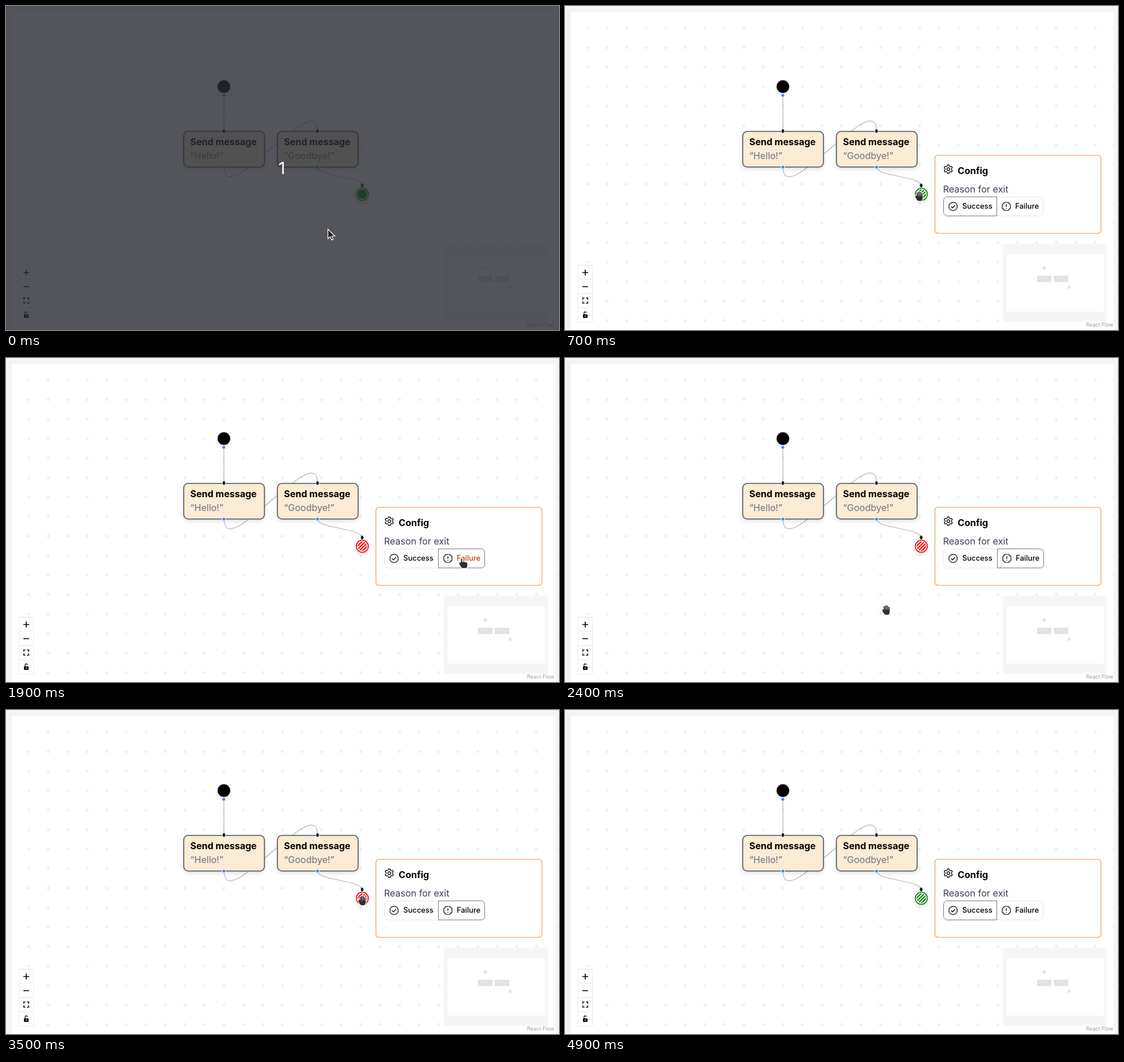
Write an HTML page that moves like this. It is 956x561 px and loops after 5.1 s.

```html
<!DOCTYPE html>
<html lang="en">
<head>
<meta charset="utf-8">
<title>Flow editor</title>
<style>
  html, body { margin: 0; width: 100%; height: 100%; overflow: hidden; background: #f3f4f6; }
  svg { display: block; width: 956px; height: 561px; font: 16px Inter, sans-serif; }
  .line { fill: none; stroke: #000; stroke-width: 1.2; stroke-linecap: round; stroke-linejoin: round; }
  .edge { fill: none; stroke: #b1b1b1; stroke-width: 1.2; }
  .title { font-weight: 700; }
  .quote { fill: #6b7280; }
  .option { font-size: 12.8px; font-weight: 500; }
  .shadow { filter: drop-shadow(0 3px 3px rgba(0, 0, 0, .14)); }
  .cursor { stroke-linecap: round; stroke-linejoin: round; }
  .cursor use:first-child { fill: #fff; stroke: #fff; stroke-width: 4.2; }
  .cursor use:last-child { fill: #2e2e2e; stroke: #2e2e2e; stroke-width: 2; }
</style>
</head>
<body>
<svg id="stage" viewBox="0 0 956 561">
  <defs>
    <pattern id="crosses" x="22.3" y="21.5" width="33.75" height="33.75" patternUnits="userSpaceOnUse">
      <path d="M13.5 16.9h6.75M16.9 13.5v6.75" stroke="#e4e4e4"/>
    </pattern>
    <pattern id="stripes" width="4" height="4" patternUnits="userSpaceOnUse" patternTransform="translate(616 326) rotate(45)">
      <path d="M2 0v4" stroke="currentColor" stroke-width="2.2"/>
    </pattern>
    <circle id="out" r="3" fill="#3b82f6" stroke="#fff"/>
    <ellipse id="in" rx="2.7" ry="3.7" fill="#0f172a" stroke="#fff" stroke-width=".8"/>
    <rect id="box" x=".8" y=".8" width="139.4" height="61.4" rx="7.5" fill="#fdecd4" stroke="#4b5563" stroke-width="1.6"/>
    <path id="grabShape" d="M-3.2-5.2-2.4 1M-.4-6.8V1M2.3-6.2V1M5-4.2 4.6 2M-5.6.5-3 4.5M-3.6 0H5.4V3Q5.2 6.6 3.8 7.4H-1.6Q-4 5-5.5 1Z"/>
    <path id="pointerShape" d="M0 1.2V9M3 6V9M5.7 6.8V10M8.3 7.8V11M-3 8.5 0 12M-1 7.6 9 8.6V12Q8.8 15 7.6 15.8H1.4Q-1.5 13-3 9Z"/>
  </defs>

  <rect x="10" y="10" width="940" height="551" fill="#fff"/>
  <rect x="10" y="10" width="940" height="551" fill="url(#crosses)"/>

  <path class="edge" d="M376.7 155V216M377 279C377 356 538.5 139 538.5 216M538.5 279C538.5 295 616 295 616 311"/>
  <g class="shadow">
    <use href="#box" x="306.5" y="216.5"/>
    <use href="#box" x="468.5" y="216.5"/>
    <circle cx="376.7" cy="139.5" r="10.9"/>
    <circle cx="616" cy="326" r="11.2" fill="#fff"/>
  </g>
  <text class="title" x="318.5" y="241">Send message</text>
  <text class="quote" x="318.5" y="265">“Hello!”</text>
  <text class="title" x="480.5" y="241">Send message</text>
  <text class="quote" x="480.5" y="265">“Goodbye!”</text>
  <circle cx="616" cy="326" r="10.4" fill="none" stroke="currentColor" stroke-width="1.5"/>
  <circle id="exit" cx="616" cy="326" r="8.3"/>
  <use href="#out" x="376.5" y="154.7"/>
  <use href="#out" x="376.7" y="279"/>
  <use href="#out" x="538.5" y="279"/>
  <use href="#in" x="376.7" y="216.5"/>
  <use href="#in" x="538.5" y="216.5"/>
  <use href="#in" x="615.7" y="310.8"/>

  <g id="panel">
    <rect x="639.5" y="258.5" width="287" height="135" rx="5" fill="#fff" stroke="#f29a4d" stroke-width="1.2"/>
    <g class="line" transform="translate(662.6 282.5)"><path id="gear"/><circle r="2.4"/></g>
    <text class="title" x="678.8" y="291">Config</text>
    <text x="653.5" y="323" fill="#374151">Reason for exit</text>
    <path d="M653.5 372v3.500a4 4 0 0 0 4 4H907a4 4 0 0 0 4-4V372" fill="none" stroke="#f6f7f8"/>
    <g id="failure">
      <path class="frame" fill="none"/>
      <path class="line" d="M759.900 340h6l4 4v6l-4 4h-6l-4-4v-6zM762.900 343.500v4M762.900 350.200v.2"/>
      <text class="option" x="778.300" y="351.300">Failure</text>
    </g>
    <g id="success">
      <path class="frame" fill="none"/>
      <circle class="line" cx="670.900" cy="347" r="7.200"/>
      <path class="line" d="M667.700 347.300l2.200 2.200 4.200-4.700"/>
      <text class="option" x="686.800" y="351.300">Success</text>
    </g>
  </g>

  <g id="controls">
    <rect x="22" y="448.500" width="26" height="99" rx="1" fill="#ececec"/>
    <path d="M23 450h24v23h-24zM23 474h24v23h-24zM23 498.500h24v23h-24zM23 523h24v23.500h-24z" fill="#fff"/>
    <path d="M30 461.500h10M35 456.500v10M30 486h10" stroke="#000" stroke-width="1.600"/>
    <path d="M30.700 508.500v-3h3M36.300 505.500h3v3M39.300 511.500v3h-3M33.700 514.500h-3v-3" fill="none" stroke="#000" stroke-width="1.400"/>
    <rect x="31" y="534" width="8" height="6" rx="1"/>
    <path d="M33 534v-2a2 2 0 0 1 4-.6" fill="none" stroke="#000" stroke-width="1.200"/>
    <circle cx="35" cy="537" r="1" fill="#fff"/>
  </g>

  <rect x="757" y="412" width="180" height="135" fill="#f6f6f6"/>
  <rect x="763" y="430" width="168.500" height="99" fill="#fff"/>
  <g fill="#e2e2e2">
    <rect x="826" y="451" width="5" height="5" rx="1"/>
    <rect x="816" y="467" width="25" height="11"/>
    <rect x="845" y="467" width="25" height="11"/>
    <rect x="869" y="484.500" width="5" height="5" rx="1"/>
  </g>
  <text x="947.500" y="555" text-anchor="end" font-size="9" fill="#999">React Flow</text>

  <g id="countdown">
    <rect width="956" height="561" fill="rgb(40,43,50)" fill-opacity=".8"/>
    <path d="M0 560.500H956" stroke="#56484f"/>
    <text x="477" y="291" text-anchor="middle" font-size="29" fill="#fff">1</text>
  </g>

  <path id="arrow" d="M0 0V16.500L4 13 6.600 18.600 9.300 17.400 6.800 12H12Z" fill="#222" stroke="#fff" stroke-width="1.200"/>
  <g id="grab" class="cursor"><use href="#grabShape"/><use href="#grabShape"/><path d="M-1.800-3V.5M1-4V.5M3.700-3V.5" stroke="#aaa" stroke-width=".6"/><use href="#grabShape" opacity="0"/></g>
  <g id="pointer" class="cursor"><use href="#pointerShape"/><use href="#pointerShape"/></g>
</svg>
<script>
  const LOOP = 5100, STEP = 100;
  const $ = id => document.getElementById(id);
  const show = (el, on) => { el.style.display = on ? '' : 'none'; };

  // The middle layer of each hand is its dark body.
  document.querySelectorAll('.cursor use:nth-child(2)').forEach(el => {
    Object.assign(el.style, { fill: '#2e2e2e', stroke: '#2e2e2e', strokeWidth: 2 });
  });

  // time, cursor, x, y
  const moves = [
    [0, 'arrow', 556.5, 386.5],
    [100, 'grab', 580, 385], [200, 'grab', 590, 369], [300, 'grab', 598, 356],
    [400, 'grab', 604, 345], [500, 'grab', 609, 337], [600, 'grab', 611, 332],
    [700, 'grab', 612, 329],
    [1200, 'pointer', 653.5, 346], [1300, 'pointer', 690, 360], [1400, 'pointer', 740, 362],
    [1500, 'pointer', 775, 352], [1600, 'pointer', 787.5, 347],
    [2200, 'grab', 730, 368], [2300, 'grab', 630, 408], [2400, 'grab', 555, 436],
    [2700, 'grab', 560, 425], [2800, 'grab', 578, 392], [2900, 'grab', 595, 359.5],
    [3000, 'grab', 604, 346], [3100, 'grab', 607, 341], [3200, 'grab', 615.5, 329.5],
    [3600, 'grab', 628, 333], [3700, 'pointer', 665, 342], [3800, 'pointer', 705, 347],
    [4400, 'grab', 660, 322], [4500, 'grab', 560, 262], [4600, 'grab', 440, 190],
    [4700, 'grab', 300, 105], [4800, 'grab', 132, 8], [4900, 'none', 0, 0]
  ];

  const frames = {
    success: 'M746.5 330.5H660.5a6 6 0 0 0-6 6V357.5a6 6 0 0 0 6 6H746.5',
    failure: 'M746.5 330.5H820.5a6 6 0 0 1 6 6V357.5a6 6 0 0 1-6 6H746.5'
  };

  function gearPath(teeth) {
    const points = [];
    for (let i = 0; i < teeth; i++) {
      const angle = i / teeth * 2 * Math.PI - Math.PI / 2;
      for (const [turn, r] of [[-.36, 5.5], [-.19, 7.5], [.19, 7.5], [.36, 5.5]]) {
        points.push(`${r * Math.cos(angle + turn)} ${r * Math.sin(angle + turn)}`);
      }
    }
    return `M${points.join('L')}Z`;
  }

  function drawOption(name, selected, hovered) {
    const frame = $(name).querySelector('.frame');
    frame.setAttribute('d', frames[name] + (selected ? 'Z' : ''));
    frame.setAttribute('stroke', selected ? '#737984' : '#e5e7eb');
    $(name).querySelector('text').setAttribute('fill', hovered ? '#c2410c' : '#000');
  }

  function draw(t) {
    const [, cursor, x, y] = moves.findLast(move => move[0] <= t);
    const open = (t >= 700 && t < 2600) || t >= 3500;
    const failed = t >= 1800 && t < 4000;
    const hovering = cursor === 'pointer' && x > 654;

    $('stage').style.color = failed ? '#f00' : '#008000';
    $('exit').setAttribute('fill', open ? 'url(#stripes)' : 'currentColor');
    show($('panel'), open);
    show($('countdown'), t < 100);
    drawOption('success', !failed, hovering && x < 746);
    drawOption('failure', failed, hovering && x >= 746);
    $('failure').setAttribute('transform', `translate(${failed ? 1 : 0})`);

    for (const name of ['arrow', 'grab', 'pointer']) {
      show($(name), name === cursor);
      $(name).setAttribute('transform', `translate(${x} ${y})`);
    }
  }

  $('gear').setAttribute('d', gearPath(6));
  const start = performance.now();
  function tick() {
    const t = (performance.now() - start) % LOOP;
    draw(Math.floor(t / STEP) * STEP);
    requestAnimationFrame(tick);
  }
  tick();
</script>
</body>
</html>
```
